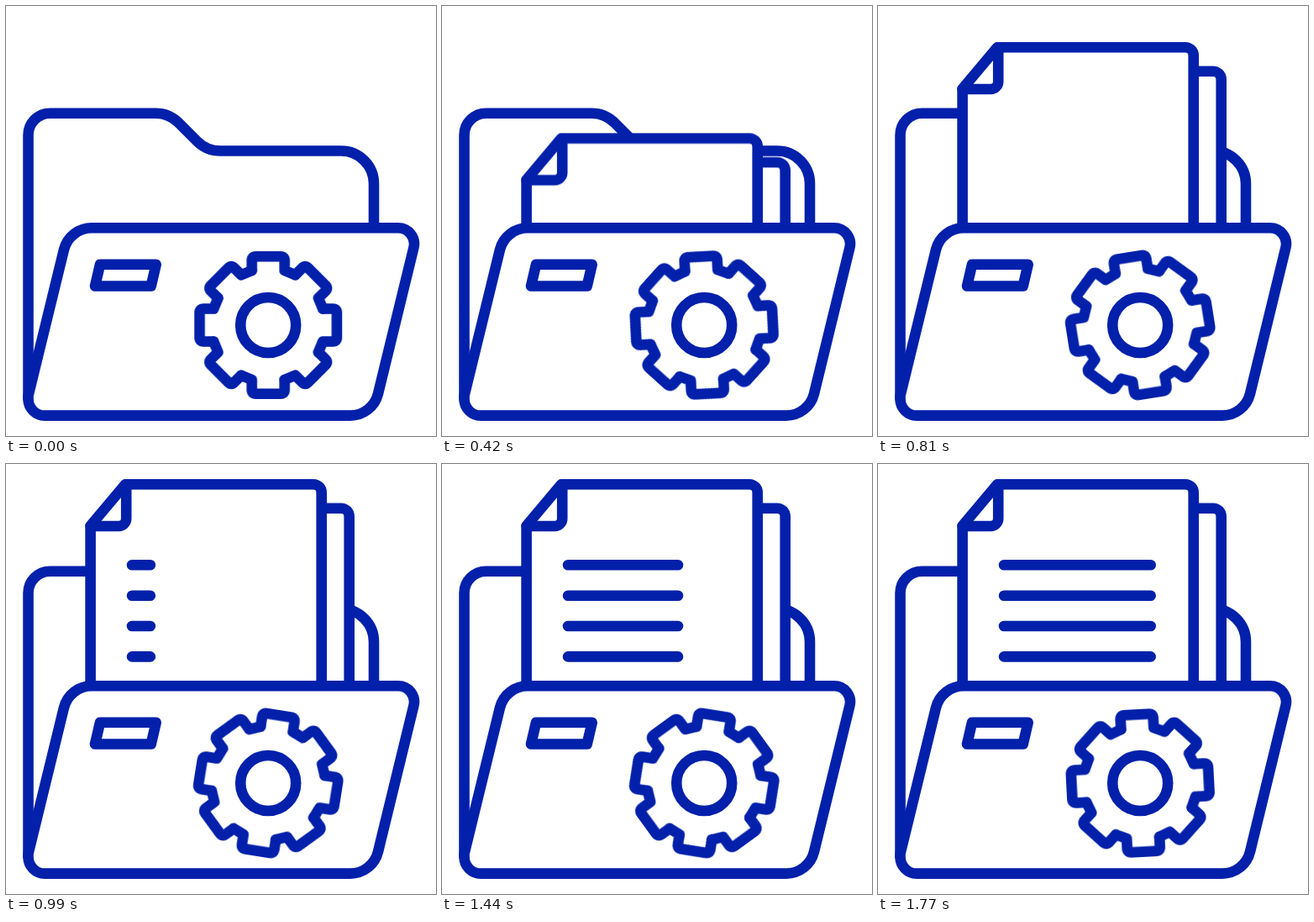
Recreate the animation shown at these times as an HTML page. Size 512 by 512 pixels, loop 1.8 s.

```html
<!DOCTYPE html>
<html lang="en">
<head>
<meta charset="utf-8">
<title>Folder with settings</title>
<style>
  html, body { margin: 0; width: 100%; height: 100%; overflow: hidden; background: #fff; }
  svg { display: block; width: 100%; height: 100%; }
  .ink { fill: none; stroke: #0320ab; stroke-width: 12.6; stroke-linecap: round; stroke-linejoin: round; }
  .paper { fill: #fff; }

  /* The motion runs in 30 ms ticks; the tiny lead keeps ticks off rounding edges. */
  .gear, .sheets, .lines { animation: 1800ms -3ms infinite; }
  .gear { animation-name: spin; animation-timing-function: steps(60); }
  .sheets { animation-name: rise; }
  .lines { stroke-dasharray: 174.7 400; animation-name: write; }

  @keyframes spin {
    from { transform: rotate(0deg); }
    to { transform: rotate(180deg); }
  }
  @keyframes rise {
    0% { transform: translateY(250px); animation-timing-function: steps(30); }
    50%, 100% { transform: translateY(0); }
  }
  @keyframes write {
    0% { visibility: hidden; stroke-dashoffset: 174.7px; animation-timing-function: step-end; }
    50% { visibility: visible; stroke-dashoffset: 174.7px; animation-timing-function: steps(24); }
    90%, 100% { visibility: visible; stroke-dashoffset: 0px; }
  }
</style>
</head>
<body>
<svg viewBox="0 0 512 512">
  <defs>
    <clipPath id="opening"><rect width="512" height="264"/></clipPath>
  </defs>
  <g class="ink">
    <path d="M26.5 468V153.7A26 26 0 0 1 52.5 127.7H178A39 39 0 0 1 205.6 139.1L227.6 161.1A39 39 0 0 0 255.2 172.5H399A39 39 0 0 1 438 211.5V264"/>

    <g clip-path="url(#opening)">
      <g class="sheets">
        <path class="paper" d="M300 270V52.7H399a9.7 9.7 0 0 1 9.7 9.7V270"/>
        <path class="paper" d="M100.6 270V73.5L142 24.2H366a9.7 9.7 0 0 1 9.7 9.7V270"/>
        <path d="M143.2 24.2V65a9 9 0 0 1-9 9H100.6"/>
        <path class="lines" d="M150 120.2H324.7M150 156.7H324.7M150 193H324.7M150 229.4H324.7"/>
      </g>
    </g>

    <!-- front flap and label -->
    <path class="paper" d="M26.5 464L69 290A34 34 0 0 1 102 264.3H467A19 19 0 0 1 485.4 288L443 461.8A34 34 0 0 1 410 487.6H46A19.5 19.5 0 0 1 26.5 468Z"/>
    <path d="M112 307.8H178.7L172.7 333.5H106Z"/>

    <g transform="translate(312.2 380)">
      <circle r="33"/>
      <g class="gear">
        <g id="half">
          <g id="pair">
            <path id="tooth" d="M-19.5-65V-77q0-4.7 4.7-4.7H14.8q4.7 0 4.7 4.7V-65L32.2-59.8"/>
            <use href="#tooth" transform="rotate(45)"/>
          </g>
          <use href="#pair" transform="rotate(90)"/>
        </g>
        <use href="#half" transform="rotate(180)"/>
      </g>
    </g>
  </g>
</svg>
</body>
</html>
```
